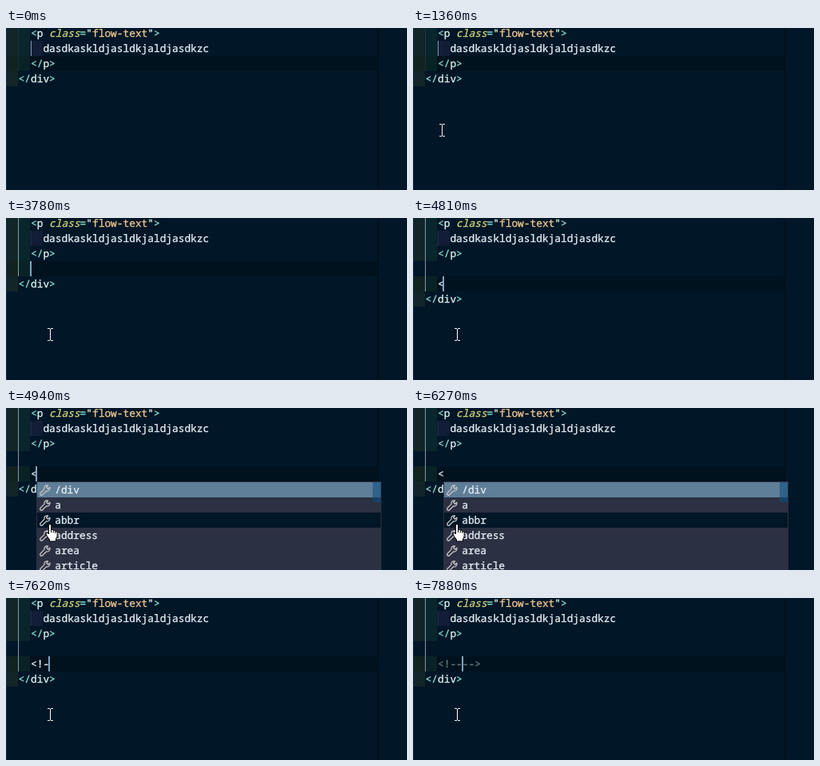
Animation, 502 px wide and 203 px high, one loop 8000 ms. Source, as an HTML page:

```html
<!DOCTYPE html>
<html lang="en">
<head>
<meta charset="utf-8">
<title>Typing an HTML comment</title>
<style>
html, body { margin: 0; width: 100%; height: 100%; overflow: hidden; background: #011627; }
svg { display: block; width: 502px; height: 203px; }
text {
  font: 12.83px "Noto Sans Mono", monospace;
  white-space: pre;
  text-rendering: geometricPrecision;
  color: #e2ecf4;
}
text, tspan { fill: currentColor; stroke: currentColor; stroke-width: .35px; }

.punct { color: #7fdbca; }
.tag { color: #d6f2ee; }
.attr { color: #cdcd78; font-style: italic; }
.quote { color: #d9f5dd; }
.string { color: #ecc48d; }
.comment { color: #637777; }
.in1 { fill: rgba(255, 255, 64, .07); }
.in2 { fill: rgba(127, 255, 127, .07); }
.in3 { fill: rgba(255, 127, 255, .07); }
.guide { fill: rgba(94, 129, 206, .15); }
.active { fill: #7e97ac; }

.drop, .open, .shut, .caret, .lt, .bang, .dash, .comment, .popup, .beam, .hand { animation: 8s step-end infinite; }
.drop { animation-name: drop; }
.open { animation-name: open; }
.shut { animation-name: shut; }
.caret { animation-name: caret; }
.lt { animation-name: lt; }
.bang { animation-name: bang; }
.dash { animation-name: dash; }
.comment { animation-name: comment; }
.popup, .hand { animation-name: popup; }
.beam { animation-name: beam; }
.pointer { animation: pointer 8s linear infinite; }

@keyframes drop {
  0% { transform: translateY(0); }
  47.25% { transform: translateY(19px); }
  51.75%, 100% { transform: translateY(38px); }
}
@keyframes open { 0% { opacity: 0; } 47.25%, 100% { opacity: 1; } }
@keyframes shut { 0% { opacity: 1; } 47.25%, 100% { opacity: 0; } }
@keyframes lt { 0% { opacity: 0; } 60.125% { opacity: 1; } 96.875%, 100% { opacity: 0; } }
@keyframes bang {
  0%, 84.25% { opacity: 0; }
  79.25%, 91.125% { opacity: 1; }
  96.875%, 100% { opacity: 0; }
}
@keyframes dash { 0% { opacity: 0; } 95.25% { opacity: 1; } 96.875%, 100% { opacity: 0; } }
@keyframes comment { 0% { opacity: 0; } 96.875%, 100% { opacity: 1; } }
@keyframes popup { 0% { opacity: 0; } 61.25% { opacity: 1; } 79.25%, 100% { opacity: 0; } }
@keyframes beam { 0%, 61.25% { opacity: 0; } .75%, 79.25%, 100% { opacity: 1; } }
@keyframes caret {
  0% { transform: translate(61px, 35px); opacity: 0; }
  28.625%, 41.125% { transform: translate(61px, 35px); opacity: 1; }
  34.875% { transform: translate(61px, 35px); opacity: 0; }
  47.25% { transform: translate(30px, 54px); opacity: 1; }
  51.75% { transform: translate(30px, 73px); opacity: 1; }
  58.125% { transform: translate(30px, 73px); opacity: 0; }
  60.125%, 72%, 84.25% { transform: translate(37px, 73px); opacity: 1; }
  66.5%, 78.375%, 90.25% { transform: translate(37px, 73px); opacity: 0; }
  79.25%, 91.125% { transform: translate(45px, 73px); opacity: 1; }
  95.25% { transform: translate(53px, 73px); opacity: 1; }
  96.875%, 100% { transform: translate(61px, 73px); opacity: 1; }
}
@keyframes pointer {
  0%, .75% { transform: translate(438px, 198px); }
  1.4% { transform: translate(411px, 191px); }
  2.9% { transform: translate(321px, 172px); }
  3.7% { transform: translate(262px, 163px); }
  4.6% { transform: translate(198px, 146px); }
  5.5% { transform: translate(147px, 132px); }
  6.8% { transform: translate(70px, 124px); }
  7.6% { transform: translate(46px, 124px); }
  8.5%, 17% { transform: translate(36px, 128px); }
  19% { transform: translate(45px, 140px); }
  22% { transform: translate(57px, 115px); }
  25% { transform: translate(82px, 66px); }
  26.9%, 27.25% { transform: translate(84px, 49px); }
  28.1% { transform: translate(90px, 42px); }
  28.7% { transform: translate(86px, 42px); }
  30% { transform: translate(82px, 50px); }
  32.25% { transform: translate(70px, 77px); }
  34.5% { transform: translate(57px, 138px); }
  35.6%, 38.2% { transform: translate(54px, 146px); }
  38.25%, 100% { transform: translate(55px, 146px); }
}
</style>
</head>
<body>
<svg viewBox="0 0 502 203">
  <defs>
    <linearGradient id="edge">
      <stop offset="0" stop-color="#010b14" stop-opacity="0"/>
      <stop offset="1" stop-color="#010b14" stop-opacity=".6"/>
    </linearGradient>
    <path id="wrench" fill="none" stroke="#c5c5c5" stroke-width="1.3" stroke-linejoin="round"
      d="M2.2 11.2L7 6.4A3.6 3.6 0 0 1 11.6 2L9.6 4.2L11.7 6.3L13.8 4.2A3.6 3.6 0 0 1 9.5 9L4.7 13.7A1.7 1.7 0 0 1 2.2 11.2Z"/>
  </defs>
  <rect width="502" height="203" fill="#011627"/>

  <!-- current line, new indent and closing tag move down together -->
  <g class="drop">
    <rect y="35" width="466" height="19" fill="#01121f"/>
    <rect class="in1" y="54" width="15" height="19"/>
    <g class="open">
      <rect class="in1" y="35" width="15" height="19"/>
      <rect class="in2" x="15" y="35" width="15" height="19"/>
      <rect class="active" x="15" y="16" width="1" height="38"/>
    </g>
    <text x="15.6" y="68"><tspan class="punct">&lt;/</tspan><tspan class="tag">div</tspan><tspan class="punct">&gt;</tspan></text>
  </g>

  <rect class="in1" width="15" height="54"/>
  <rect class="in2" x="15" width="15" height="54"/>
  <rect class="in3" x="30" y="16" width="16" height="19"/>
  <rect width="1" height="203" fill="#0f2d4f"/>
  <rect class="guide" x="15" width="1" height="54"/>
  <rect class="guide" x="31" y="16" width="1" height="19"/>
  <rect class="active open" x="15" width="1" height="54"/>
  <rect class="active shut" x="31" y="16" width="1" height="19"/>
  <rect x="463" width="4" height="203" fill="url(#edge)"/>

  <text x="31" y="11"><tspan class="punct">&lt;</tspan><tspan class="tag">p</tspan> <tspan class="attr">class</tspan><tspan class="punct">=</tspan><tspan class="quote">"</tspan><tspan class="string">flow-text</tspan><tspan class="quote">"</tspan><tspan class="punct">&gt;</tspan></text>
  <text x="46.4" y="30">dasdkaskldjasldkjaldjasdkzc</text>
  <text x="31" y="49"><tspan class="punct">&lt;/</tspan><tspan class="tag">p</tspan><tspan class="punct">&gt;</tspan></text>

  <text class="lt" x="31" y="87">&lt;</text>
  <text class="bang" x="38.7" y="87">!</text>
  <text class="dash" x="46.4" y="87">-</text>
  <text class="comment" x="31" y="87">&lt;!----&gt;</text>
  <rect class="caret" width="2" height="19" fill="#80a4c2"/>

  <g class="popup">
    <rect x="38" y="92" width="432" height="111" fill="#2c3043"/>
    <rect x="39" y="93" width="430" height="19" fill="#5f7e97"/>
    <rect x="39" y="131" width="430" height="19" fill="#011627"/>
    <g id="items"></g>
    <rect x="459" y="93" width="10" height="25" fill="#084d81" fill-opacity=".55"/>
  </g>

  <g class="pointer">
    <path class="beam" fill="none" stroke="#fff" d="M-3 -7.5H0M1 -7.5H4M.5 -7V7M-3 7.5H0M1 7.5H4"/>
    <g class="hand">
      <path fill="#fff" stroke="#000" stroke-linejoin="round"
        d="M-1.5 10V1A1.5 1.5 0 0 1 1.5 1V6.5Q4 5.6 4.2 7.4Q6.4 6.8 6.8 8.4Q9.2 8 9.2 10.5V14Q9.2 16 7.5 18V21H-.5V19Q-3 16 -4.5 13Q-5.8 10.6 -4 10.2Q-2.6 10.2 -1.5 12Z"/>
      <path fill="none" stroke="#000" d="M1.5 6.5V10M4.2 7.4V10.5M6.8 8.4V11"/>
    </g>
  </g>
</svg>
<script>
const names = ["/div", "a", "abbr", "address", "area", "article"];
document.getElementById("items").innerHTML = names.map((name, i) => {
  const top = 93 + 19 * i;
  return `<use href="#wrench" x="41" y="${top + 2}"/><text x="61.2" y="${top + 14}">${name}</text>`;
}).join("");
</script>
</body>
</html>
```
